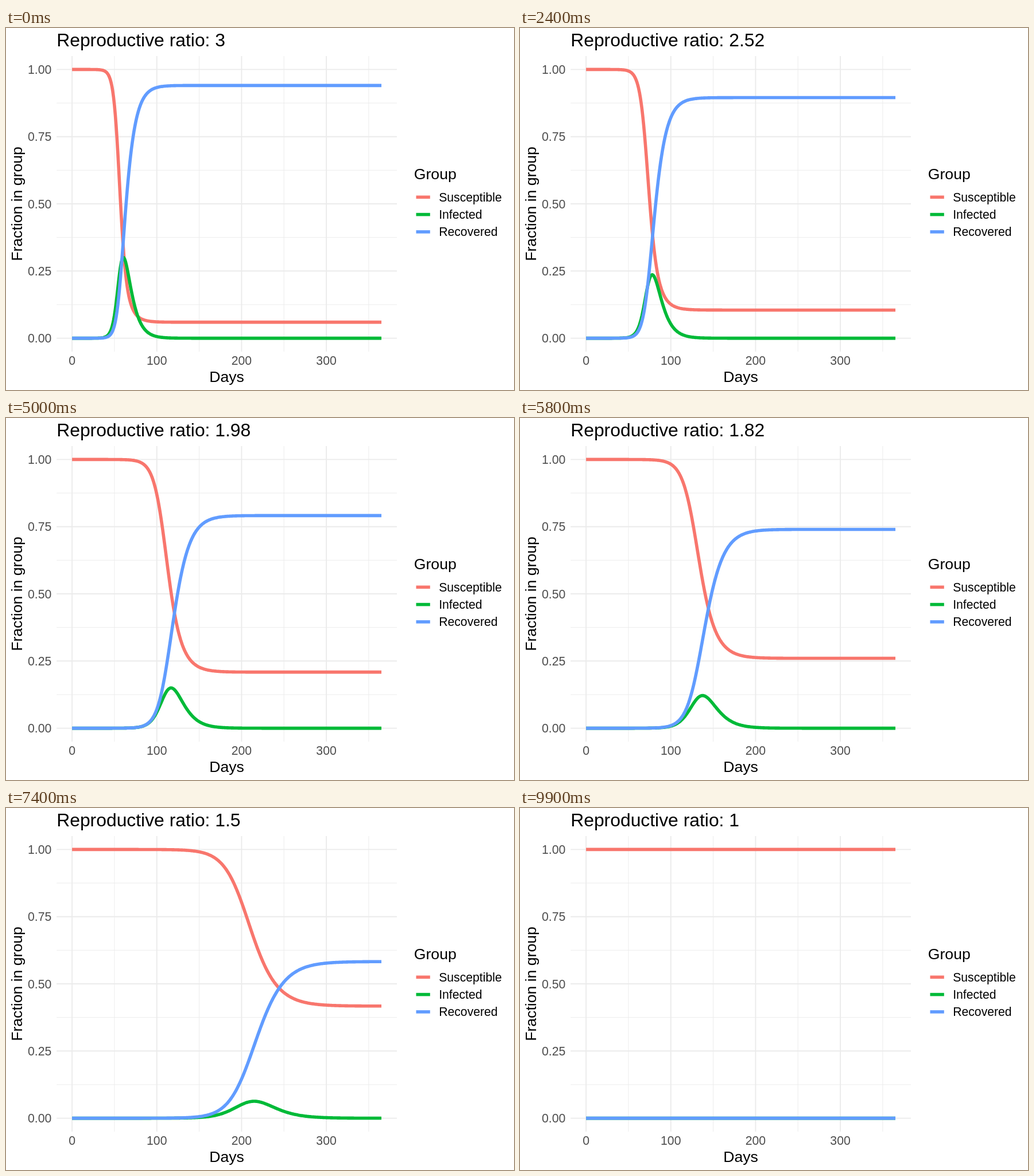
These frames come from a looping animation (885x632 px, 10 s). An HTML page:

```html
<!DOCTYPE html>
<html lang="en">
<head>
<meta charset="utf-8">
<title>Reproductive ratio</title>
<style>
  html, body { margin: 0; width: 100%; height: 100%; overflow: hidden; background: #fff; }
  svg { display: block; width: 885px; height: 632px; }
  text { font-family: "Liberation Sans", Arial, sans-serif; }
  .axis { font-size: 21.2px; fill: #4d4d4d; }
  .name { font-size: 26.6px; }
  .key { font-size: 21.2px; }
  .curve { fill: none; stroke-width: 5.6; stroke-linejoin: round; }
</style>
</head>
<body>
<svg id="chart" viewBox="0 0 885 632"></svg>
<script>
const FRAME_MS = 100, FRAMES = 100, STATES = 100;
const DAYS = 365, SUBSTEPS = 4;
const RECOVERY = 1 / 7, SEED = 1 / 15e6;
const PANEL = { left: 88.2, right: 681, top: 49, bottom: 565 };
const GROUPS = [
  ["Susceptible", "#F8766D"],
  ["Infected", "#00BA38"],
  ["Recovered", "#619CFF"]
];

const chart = document.getElementById("chart");
const px = day => 115.1 + day * 1.4765;
const py = share => 541.6 - share * 469.2;

function add(tag, attrs, content = "") {
  const node = document.createElementNS("http://www.w3.org/2000/svg", tag);
  for (const key in attrs) node.setAttribute(key, attrs[key]);
  node.textContent = content;
  chart.appendChild(node);
  return node;
}

function line(x1, y1, x2, y2, stroke, width) {
  return add("line", { x1, y1, x2, y2, stroke, "stroke-width": width });
}

function grid(offsetX, offsetY, width) {
  for (let i = 0; i < 5; i++) {
    const y = py(i / 4 + offsetY);
    if (y > PANEL.top) line(PANEL.left, y, PANEL.right, y, "#ebebeb", width);
  }
  for (let i = 0; i < 4; i++) {
    const x = px(i * 100 + offsetX);
    line(x, PANEL.top, x, PANEL.bottom, "#ebebeb", width);
  }
}

grid(50, 0.125, 0.94);
grid(0, 0, 1.87);
const curves = GROUPS.map(([, stroke]) => add("path", { class: "curve", stroke }));

for (let i = 0; i < 5; i++)
  add("text", { class: "axis", x: 79.3, y: py(i / 4) + 7.5, "text-anchor": "end" }, (i / 4).toFixed(2));
for (let i = 0; i < 4; i++)
  add("text", { class: "axis", x: px(i * 100), y: 588, "text-anchor": "middle" }, i * 100);

add("text", { class: "name", x: 384.6, y: 617.5, "text-anchor": "middle" }, "Days");
add("text", { class: "name", transform: "translate(28 307) rotate(-90)", "text-anchor": "middle" }, "Fraction in group");
add("text", { class: "name", x: 710.8, y: 264 }, "Group");
GROUPS.forEach(([label, color], i) => {
  const y = 295.3 + i * 30.3;
  line(714.5, y, 738.8, y, color, 5.6);
  add("text", { class: "key", x: 754.2, y: y + 7.3 }, label);
});
const title = add("text", { x: 88.2, y: 31.5, "font-size": 31.85 });

// SIR model, integrated with fourth-order Runge-Kutta.
function epidemic(ratio) {
  const slope = ([s, i]) => {
    const caught = ratio * RECOVERY * s * i;
    return [-caught, caught - RECOVERY * i];
  };
  const step = (state, d, h) => state.map((v, n) => v + d[n] * h);
  const h = 1 / SUBSTEPS;
  let state = [1 - SEED, SEED];
  const days = [];
  for (let day = 0; day <= DAYS; day++) {
    days.push([...state, 1 - state[0] - state[1]]);
    for (let n = 0; n < SUBSTEPS; n++) {
      const a = slope(state);
      const b = slope(step(state, a, h / 2));
      const c = slope(step(state, b, h / 2));
      const d = slope(step(state, c, h));
      state = step(state, a.map((v, k) => (v + 2 * b[k] + 2 * c[k] + d[k]) / 6), h);
    }
  }
  return days;
}

function draw(frame) {
  const state = Math.round(frame * STATES / (FRAMES - 1));
  const ratio = Number((3 - 2 * state / STATES).toFixed(2));
  const days = epidemic(ratio);
  title.textContent = "Reproductive ratio: " + ratio;
  curves.forEach((curve, g) => {
    const points = days.map((shares, day) => px(day).toFixed(2) + " " + py(shares[g]).toFixed(2));
    curve.setAttribute("d", "M" + points.join("L"));
  });
}

const start = performance.now();
let shown = -1;
function tick() {
  const frame = Math.floor((performance.now() - start) / FRAME_MS) % FRAMES;
  if (frame !== shown) draw(shown = frame);
  requestAnimationFrame(tick);
}
tick();
</script>
</body>
</html>
```
